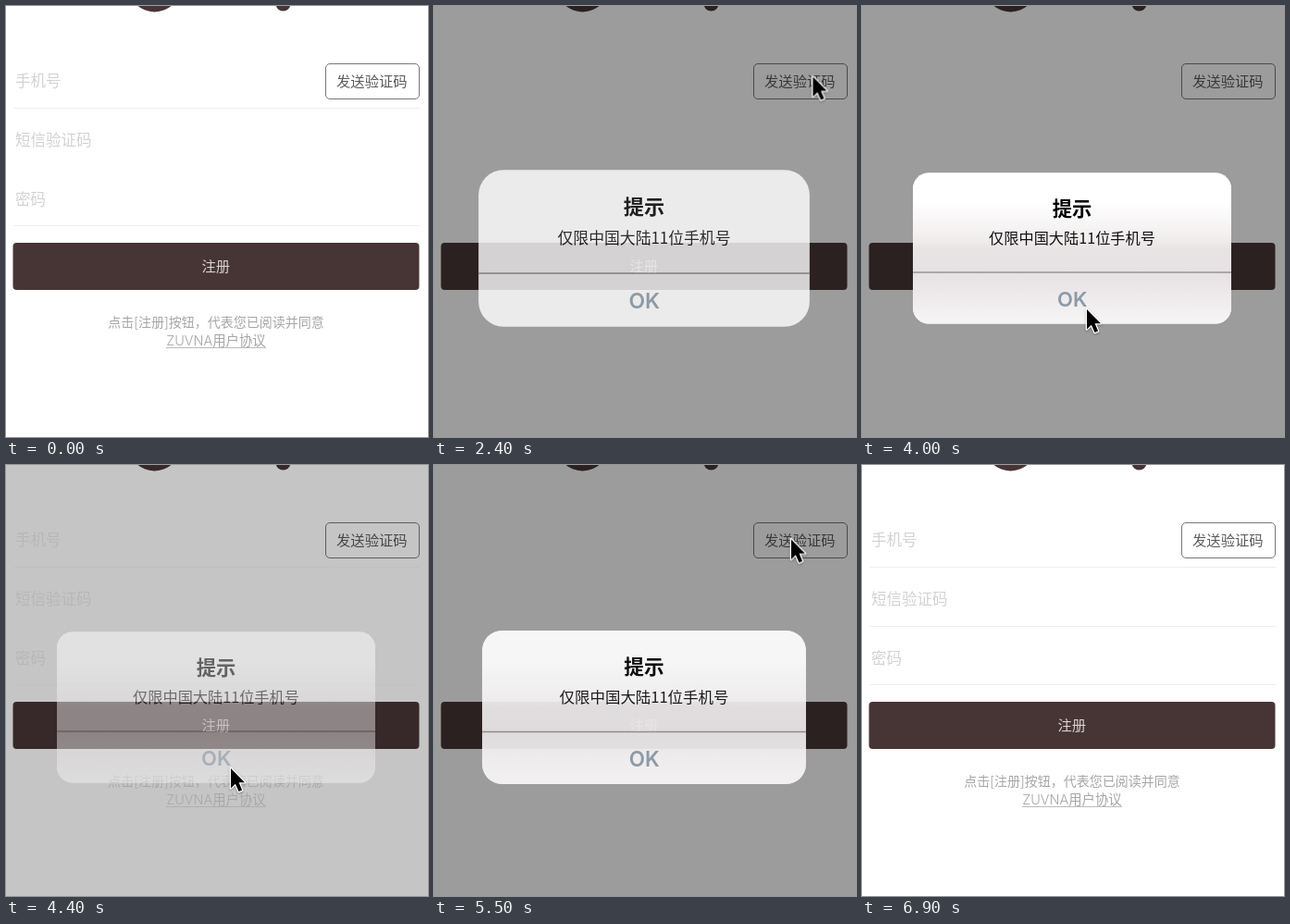
These frames come from a looping animation (456x466 px, 7 s). An HTML page:

```html
<!DOCTYPE html>
<html lang="zh-CN">
<head>
<meta charset="utf-8">
<title>注册</title>
<style>
  @property --show { syntax: "<number>"; inherits: true; initial-value: 0; }
  @property --zoom { syntax: "<number>"; inherits: true; initial-value: 1.2; }

  html, body { margin: 0; width: 100%; height: 100%; overflow: hidden; background: #fff; }

  #stage {
    --brown: #473536;
    --dim: clamp(0, (var(--show) - .08) * 1.4, 1);
    display: block;
    width: 456px;
    height: 466px;
    font: 16.5px "Noto Sans CJK SC", "Noto Sans CJK", sans-serif;
    animation: alert 7s linear infinite;
  }

  .brown { fill: var(--brown); }
  .faint { opacity: calc(1 - var(--dim)); font-weight: 300; }
  .hint { fill: #d2d2d3; }
  .rule { fill: #efefef; }
  .mid { text-anchor: middle; }
  .label { font-size: 15.3px; font-weight: 300; }
  .legal { font-size: 14px; fill: #a6a6a6; }
  .terms { font: 300 14.4px Inter, "Noto Sans CJK SC", "Noto Sans CJK", sans-serif; }

  #shade { opacity: calc(var(--dim) * .39); }

  #alert {
    opacity: var(--show);
    transform-origin: 227px 262px;
    transform: scale(var(--zoom));
  }
  #alert rect { rx: clamp(17px, 17px + (var(--zoom) - 1) * 225px, 26px); }
  #alert .tint { opacity: clamp(0, (1.04 - var(--zoom)) * 25, 1); }
  .title { font-size: 21.3px; font-weight: 600; }
  .message { font-size: 16.2px; }
  .ok { font: 600 22px Inter, sans-serif; fill: #8b9aa8; }

  #late { animation: late 7s step-end infinite; }
  #cursor {
    filter: drop-shadow(0 1px 1px rgba(0, 0, 0, .3));
    animation: move 7s ease-in-out infinite;
  }

  /* Springs in while shrinking, then fades out at full size. */
  @keyframes alert {
    0%, 32.086%, 75.543% {
      --show: 0; --zoom: 1.2;
      animation-timing-function: linear(0, .255, .58, .789, .901, .955, .98, .992, 1);
    }
    37.8%, 60%, 81.257%, 92.571% {
      --show: 1; --zoom: 1;
      animation-timing-function: ease-in-out;
    }
    65.714%, 97.857% { --show: 0; --zoom: 1; animation-timing-function: step-end; }
    65.72%, 97.86%, 100% { --show: 0; --zoom: 1.2; }
  }

  @keyframes late {
    0% { visibility: hidden; }
    68.571%, 100% { visibility: visible; }
  }

  @keyframes move {
    0%, 18.5% { transform: translate(464px, 152px); animation-timing-function: ease-out; }
    24.286%, 47.143% { transform: translate(409.5px, 76.5px); }
    52.857% { transform: translate(249px, 340px); }
    54.286%, 64.286% { transform: translate(243px, 328px); }
    71.429%, 80% { transform: translate(386px, 80.5px); }
    87.143% { transform: translate(366px, 212.5px); }
    90%, 93.571% { transform: translate(243px, 328px); }
    97.857%, 100% { transform: translate(464px, 250px); }
  }
</style>
</head>
<body>
<svg id="stage" viewBox="0 0 456 466" xmlns="http://www.w3.org/2000/svg">
  <defs>
    <linearGradient id="frost" x1="0" y1="0" x2="0" y2="1">
      <stop offset=".2" stop-color="#fff"/>
      <stop offset=".45" stop-color="#f0ecec"/>
      <stop offset=".5" stop-color="#e8e3e4"/>
      <stop offset=".66" stop-color="#e6e1e3"/>
      <stop offset="1" stop-color="#f7f5f6"/>
    </linearGradient>
  </defs>

  <rect width="456" height="466" fill="#fff"/>
  <circle class="brown" cx="160.5" cy="-21.5" r="28"/>
  <circle class="brown" cx="299.5" cy="-2.4" r="7.9"/>

  <g class="faint">
    <g class="hint">
      <text x="10" y="87">手机号</text>
      <text x="10" y="151">短信验证码</text>
      <text x="10" y="215">密码</text>
    </g>
    <g class="rule">
      <rect x="8" y="110" width="439" height="1"/>
      <rect id="late" x="8" y="174" width="439" height="1"/>
      <rect x="8" y="237" width="439" height="1"/>
    </g>
    <g class="legal mid">
      <text x="227" y="347">点击[注册]按钮，代表您已阅读并同意</text>
      <text class="terms" x="227" y="366.5">ZUVNA用户协议</text>
      <rect x="173" y="369" width="108" height="1" fill="#bbb"/>
    </g>
  </g>

  <rect x="345.5" y="62.5" width="101" height="38" rx="4.5" fill="none" stroke="#787878"/>
  <text class="label mid" x="395.3" y="86.8" fill="#5c5c5c">发送验证码</text>

  <rect class="brown" x="7.5" y="256" width="439" height="51" rx="4"/>
  <text class="label mid" x="226.8" y="286.8" fill="#d8d3d3">注册</text>

  <rect id="shade" width="456" height="466"/>

  <g id="alert" class="mid">
    <rect x="55" y="180.5" width="344" height="163" fill="#fff"/>
    <rect class="tint" x="55" y="180.5" width="344" height="163" fill="url(#frost)"/>
    <path d="M55 288H399" stroke="#979597" stroke-width="1.4"/>
    <text class="title" x="227" y="226.5">提示</text>
    <text class="message" x="227" y="257.2" fill="#111">仅限中国大陆11位手机号</text>
    <text class="ok" x="227.3" y="324.5">OK</text>
  </g>

  <path id="cursor" d="M0 0V21.4L4.9 16.8L8.5 25.1L12.1 23.6L8.6 15.3H15Z"
        stroke="#fff" stroke-width="2.6" stroke-linejoin="round" paint-order="stroke"/>
</svg>
</body>
</html>
```
